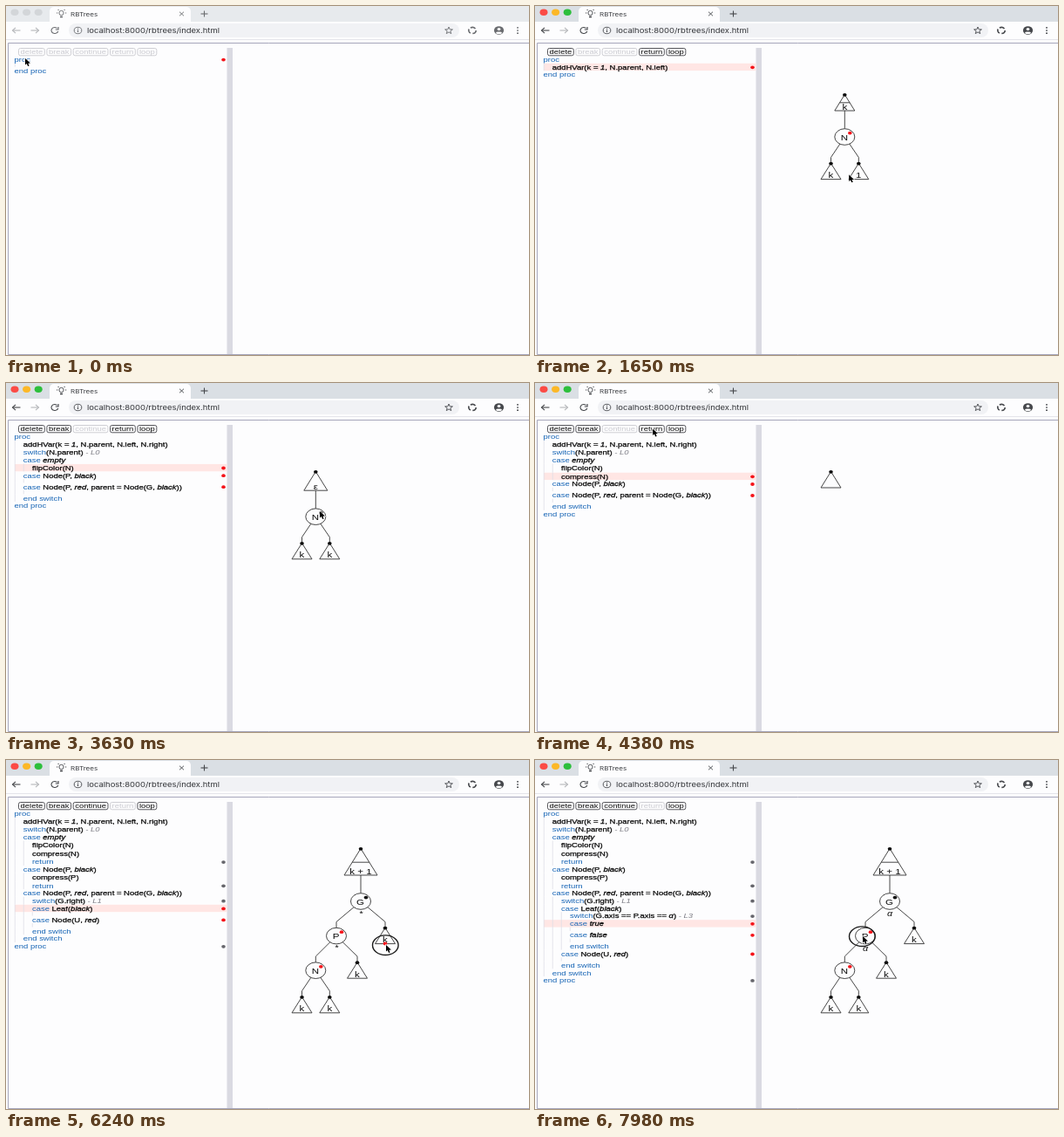
An HTML page with a canvas that plays this animation: 600x400 px, repeating every 8000 ms.

```html
<!DOCTYPE html>
<html lang="en">
<head>
<meta charset="utf-8">
<title>RBTrees</title>
<style>
  html, body { margin: 0; width: 100%; height: 100%; overflow: hidden; background: #fdfdfe; }
  canvas { display: block; width: 600px; height: 400px; }
</style>
</head>
<body>
<canvas width="600" height="400"></canvas>
<script>
const ctx = document.querySelector('canvas').getContext('2d');
const LOOP = 8000, WIDEN = 1.2;
const PAPER = '#fdfdfe', INK = '#0c0c0c', EDGE = '#333', RED = '#f5141a', GREY = '#66666c';
const PALE = '#cacad0', GUIDE = '#dedee6';
const SANS = '"Liberation Sans", Arial, sans-serif', UI = 'Inter, sans-serif';

// Each click advances the session by one step; the last one only shows its ring.
const clicks = [120, 780, 1400, 1800, 3040, 3500, 3900, 4450, 4880, 5270, 6180, 7080, 7900];
const LAST_STEP = 12, RING_TIME = 120;

const pointerPath = [
  [0, 22, 60], [150, 22, 60], [780, 355, 112], [850, 355, 112], [960, 342, 109],
  [1350, 339, 192], [1450, 339, 192], [1780, 371, 194], [1850, 371, 194], [2340, 234.5, 161],
  [2720, 502, 140], [3000, 355, 112], [3080, 355, 112], [3480, 360, 147], [3650, 360, 147],
  [3880, 355, 152], [3940, 355, 152], [4400, 134, 52], [4480, 134, 52], [4840, 379, 160],
  [4900, 379, 160], [5130, 174, 64], [5250, 134, 52], [5310, 134, 52], [5820, 588, 236],
  [6170, 436, 212], [6350, 436, 212], [6750, 407, 176], [7060, 379, 213], [7300, 379, 213],
  [7600, 388, 206], [7890, 376, 202], [8000, 376, 202]
];

function pointerAt(t) {
  const i = pointerPath.findIndex(p => p[0] > t);
  const [t0, x0, y0] = pointerPath[i - 1], [t1, x1, y1] = pointerPath[i];
  const u = (t - t0) / (t1 - t0), e = u * u * (3 - 2 * u);
  return [x0 + (x1 - x0) * e, y0 + (y1 - y0) * e];
}

// ---- drawing helpers ----
function text(str, x, y, { size = 7.9, color = INK, font = SANS, style = '', align = 'left', heavy = 0 } = {}) {
  ctx.save();
  ctx.translate(x, y);
  ctx.scale(WIDEN, 1);
  ctx.font = `${style} ${size}px ${font}`;
  ctx.fillStyle = ctx.strokeStyle = color;
  ctx.textAlign = align;
  ctx.fillText(str, 0, 0);
  if (heavy) {
    ctx.lineWidth = heavy;
    ctx.strokeText(str, 0, 0);
  }
  const width = ctx.measureText(str).width * WIDEN;
  ctx.restore();
  return width;
}

function rect(x, y, w, h, color) {
  ctx.fillStyle = color;
  ctx.fillRect(x, y, w, h);
}

function line(points, color = EDGE, width = 0.9, closed = false) {
  ctx.beginPath();
  points.forEach(([x, y]) => ctx.lineTo(x, y));
  if (closed) ctx.closePath();
  ctx.strokeStyle = color;
  ctx.lineWidth = width;
  ctx.stroke();
}

function oval(x, y, rx, ry, { fill, stroke, width = 0.9, from = 0, to = 7 } = {}) {
  ctx.beginPath();
  ctx.ellipse(x, y, rx, ry, 0, from, Math.min(to, from + 2 * Math.PI));
  if (fill) { ctx.fillStyle = fill; ctx.fill(); }
  if (stroke) { ctx.strokeStyle = stroke; ctx.lineWidth = width; ctx.stroke(); }
}

const dot = (x, y, color) => oval(x, y, 2.3, 1.9, { fill: color });

function roundBox(x, y, w, h, r, { fill, stroke } = {}) {
  ctx.beginPath();
  ctx.roundRect(x, y, w, h, r);
  if (fill) { ctx.fillStyle = fill; ctx.fill(); }
  if (stroke) { ctx.strokeStyle = stroke; ctx.lineWidth = 0.9; ctx.stroke(); }
}

// ---- browser window ----
function drawBrowser(active) {
  const icon = active ? '#46484c' : '#6a6c70', faint = '#b4b6ba';
  rect(0, 0, 600, 18, active ? '#dadfe4' : '#e7eaed');
  const lights = active ? ['#fb4b45', '#fcb827', '#2dbf3c'] : Array(3).fill('#d3d6d9');
  lights.forEach((c, i) => oval(10 + 13.6 * i, 7.3, 4.5, 3.7, { fill: c }));

  roundBox(50, 1, 162, 20, [5, 5, 0, 0], { fill: PAPER });
  oval(63.5, 8, 2.6, 2.7, { stroke: icon });
  line([[62, 12.5], [65, 12.5]], icon, 1.6);
  [[58.5, 8], [68.5, 8], [60, 4.5], [67, 4.5]].forEach(([x, y]) => rect(x - 0.5, y - 0.5, 1.2, 1, icon));
  text('RBTrees', 74, 11.6, { size: 6.7, font: UI, color: '#3c3e42' });
  line([[199, 6.7], [204, 11.3]], icon);
  line([[204, 6.7], [199, 11.3]], icon);
  line([[223.5, 9], [231.5, 9]], icon, 1.1);
  line([[227.5, 5.5], [227.5, 12.5]], icon, 1.1);

  rect(0, 18, 600, 20, PAPER);
  roundBox(72, 20, 448, 16, 8, { fill: '#f1f2f5' });
  const arrow = (x, dir, c) => {
    line([[x - 4.5, 28], [x + 4.5, 28]], c, 1.1);
    line([[x + dir, 24.8], [x + 4.5 * dir, 28], [x + dir, 31.2]], c, 1.1);
  };
  arrow(12, -1, active ? icon : faint);
  arrow(33, 1, faint);
  oval(56, 28, 4, 3.4, { stroke: icon, width: 1.1, from: 0.3, to: 5.4 });
  line([[60, 24], [60, 27], [56.8, 27]], icon, 1.2);
  oval(82.5, 28, 4.3, 3.7, { stroke: icon });
  line([[82.5, 27.5], [82.5, 30]], icon, 1.1);
  rect(82, 25.6, 1.1, 1, icon);
  text('localhost:8000/rbtrees/index.html', 93, 31, { font: UI, color: '#303236' });

  const star = Array.from({ length: 10 }, (_, i) => {
    const a = Math.PI * (i / 5 - 0.5), r = i % 2 ? 0.42 : 1;
    return [508 + 4.6 * r * Math.cos(a), 28.2 + 4.2 * r * Math.sin(a)];
  });
  line(star, icon, 0.9, true);
  for (let i = 0; i < 3; i++) {
    oval(535, 28, 4.2, 3.5, { stroke: icon, width: 1.6, from: i * 2.09, to: i * 2.09 + 1.5 });
  }
  oval(565.5, 28, 5.6, 4.8, { fill: icon });
  oval(565.5, 26.4, 1.9, 1.5, { fill: PAPER });
  oval(565.5, 30.8, 3.4, 1.3, { fill: PAPER });
  [24.8, 28, 31.2].forEach(y => oval(587, y, 1, 0.85, { fill: icon }));

  line([[0, 38.5], [600, 38.5]], '#e2e3e8');
  line([[600, 42.5], [2.5, 42.5], [2.5, 399.5], [600, 399.5]], '#9c9cb4');
  rect(253.5, 48, 6.5, 351, '#dadae2');
}

function drawButtons(step) {
  const ready = [8, 10, 11, 12].includes(step); // the tree again fits the loop's entry condition
  const enabled = {
    delete: step > 1, break: step > 4, continue: ready,
    return: step > 0 && !ready, loop: step > 0
  };
  let x = 14.5;
  for (const [name, on] of Object.entries(enabled)) {
    const color = on ? INK : PALE;
    const width = text(name, x + 2, 55.3, { color }) + 4;
    roundBox(x, 48.5, width, 8.3, 2, { stroke: on ? '#44444a' : PALE });
    x += width + 2.6;
  }
}

// ---- program text: ~keyword~, _italic_, ^note^ ----
function programAt(step) {
  const lines = [];
  const add = (depth, str, color, selected) => lines.push({ depth, str, color, selected });
  const current = (depth, str, at) => add(depth, str, step === at && RED, step === at);
  const branch = (depth, str, at) => add(depth, str, step <= at && RED, step === at);

  current(0, '~proc~', 1);
  if (step === 0) lines[0].color = RED;
  if (step > 1) {
    const args = ['N.parent', 'N.left', 'N.right'].slice(0, step - 1).join(', ');
    current(1, `addHVar(k = _1_, ${args})`, Math.min(step, 4));
  }
  if (step > 4) {
    add(1, '~switch~(N.parent) ^- L0^');
    branch(1, '~case~ _empty_', 5);
    if (step > 5) current(2, 'flipColor(N)', 6);
    if (step > 6) current(2, 'compress(N)', 7);
    if (step > 7) add(2, '~return~', GREY);
    branch(1, '~case~ Node(P, _black_)', 8);
    if (step > 8) current(2, 'compress(P)', 9);
    if (step > 9) add(2, '~return~', GREY);
    branch(1, '~case~ Node(P, _red_, parent = Node(G, _black_))', 10);
    if (step > 10) {
      add(2, '~switch~(G.right) ^- L1^', GREY);
      branch(2, '~case~ Leaf(_black_)', 11);
      if (step > 11) {
        add(3, '~switch~(G.axis == P.axis == _α_) ^- L3^', GREY);
        branch(3, '~case~ _true_', 12);
        add(3, '~case~ _false_', RED);
        add(3, '~end switch~');
      }
      add(2, '~case~ Node(U, _red_)', RED);
      add(2, '~end switch~');
    }
    add(1, '~end switch~');
  }
  add(0, '~end proc~', step > 7 && GREY);
  return lines;
}

const markStyles = {
  '~': { color: '#1463b4' },
  '_': { style: 'italic', heavy: 0.3 },
  '^': { style: 'italic', color: '#7c7c84' }
};
const plainStyle = { heavy: 0.25 };

function drawProgram(step) {
  const lines = programAt(step), ROW = 8.7;
  let y = 61;
  lines.forEach(({ depth, str, color, selected }, i) => {
    const next = lines[i + 1];
    const opens = /^~(proc|case)/.test(str);
    const empty = next && opens && next.depth <= depth;
    const spaced = next && !empty && next.depth === depth && !/^~(case|end)/.test(next.str);
    const height = ROW + (empty ? 4.3 : spaced ? 1.1 : 0);

    if (selected) rect(10, y - 4, 243.5, 8.4, '#ffe6e4');
    for (let d = 0; d < depth; d++) rect(9.8 + 10 * d, y - 4.3, 0.8, height, GUIDE);
    if (empty) rect(9.8 + 10 * depth, y + 4.4, 0.8, 4.3, GUIDE);

    let x = 9.5 + 10.2 * depth;
    for (const run of str.match(/([~_^])[^~_^]*\1|[^~_^]+/g)) {
      const style = markStyles[run[0]];
      x += text(style ? run.slice(1, -1) : run, x, y + 2.9, style || plainStyle);
    }
    if (color) dot(249.5, y + 0.6, color);
    y += height;
  });
}

// ---- tree ----
const leaf = (x, label) => ({ x, label });
const node = (x, label, color, left, right, axis) => ({ x, label, color, left, right, axis });

function triangle(x, top, half, height) {
  line([[x, top], [x + half, top + height], [x - half, top + height]], EDGE, 0.9, true);
  dot(x, top + 0.3, INK);
}

function drawSubtree(tree, top) {
  const { x, label, color, left, right, axis } = tree;
  if (!left) {
    triangle(x, top, 11.5, 18.3);
    text(label, x, top + 16.8, { size: 9.6, align: 'center' });
    return;
  }
  const cy = top + 9.3;
  for (const child of [left, right]) {
    line([[x, cy], [child.x, cy + 23.5], [child.x, cy + 30.3]]);
    drawSubtree(child, cy + 30.3);
  }
  oval(x, cy, 11.5, 9.3, { fill: PAPER, stroke: EDGE });
  text(label, x - 0.5, cy + 3.5, { size: 9.6, align: 'center' });
  dot(x + 6, cy - 4.4, color);
  if (axis) text(axis, x, cy + (axis === '*' ? 16.5 : 17.3), { size: 9, style: 'italic', align: 'center' });
}

const rootShapes = { // half width, height, bar offset
  '1': [11.5, 18.5, 9.3], 'k': [11.5, 18.5, 9.3], 'ε': [13.5, 21.7, 0], 'k + 1': [19, 30.5, 15.7]
};

function drawRooted(tree, label) {
  const [half, height, bar] = rootShapes[label], top = 101.5, base = top + height;
  triangle(tree.x, top, half, height);
  if (bar) {
    const w = half * bar / height;
    line([[tree.x - w, top + bar], [tree.x + w, top + bar]]);
  }
  text(label, tree.x, base - 1, { size: 9.6, align: 'center' });
  line([[tree.x, base], [tree.x, base + 20.7]]);
  drawSubtree(tree, base + 20.7);
}

function drawTree(step) {
  if (step === 0) return;
  if (step === 7 || step === 9) return triangle(339.5, 101.5, 11.5, 18.5);
  const n = node(355.3, 'N', step === 6 ? INK : RED,
    leaf(339.5, step > 2 ? 'k' : '1'), leaf(371.3, step > 3 ? 'k' : '1'));
  if (step < 7) return drawRooted(n, step > 4 ? 'ε' : step > 1 ? 'k' : '1');
  const axis = step > 9 && (step > 11 ? 'α' : '*');
  const p = node(379, 'P', step > 9 ? RED : INK, n, leaf(403, 'k'), axis);
  drawRooted(step > 9 ? node(407, 'G', INK, p, leaf(435, 'k'), axis) : p, 'k + 1');
}

function drawPointer(t, step) {
  const [x, y] = pointerAt(t);
  if (clicks.some(c => t >= c && t < c + RING_TIME)) {
    if (step === 11) dot(435, 210.5, RED);
    oval(x - 0.7, y + 0.2, 14.8, 11.3, { stroke: '#1c1c1c', width: 1.4 });
  }
  ctx.beginPath();
  [[0, 0], [0, 7.6], [1.8, 6.1], [3.1, 9], [4.6, 8.4], [3.4, 5.7], [5.9, 5.6]]
    .forEach(([dx, dy]) => ctx.lineTo(x + dx, y + dy));
  ctx.closePath();
  ctx.strokeStyle = '#fff';
  ctx.lineWidth = 1.2;
  ctx.stroke();
  ctx.fillStyle = '#000';
  ctx.fill();
}

function draw(now) {
  const t = now % LOOP;
  const step = Math.min(LAST_STEP, clicks.filter(c => t >= c).length);
  rect(0, 0, 600, 400, PAPER);
  drawBrowser(step > 0);
  drawButtons(step);
  drawProgram(step);
  drawTree(step);
  drawPointer(t, step);
}

const start = performance.now();
function tick() {
  draw(performance.now() - start);
  requestAnimationFrame(tick);
}
tick();
</script>
</body>
</html>
```
